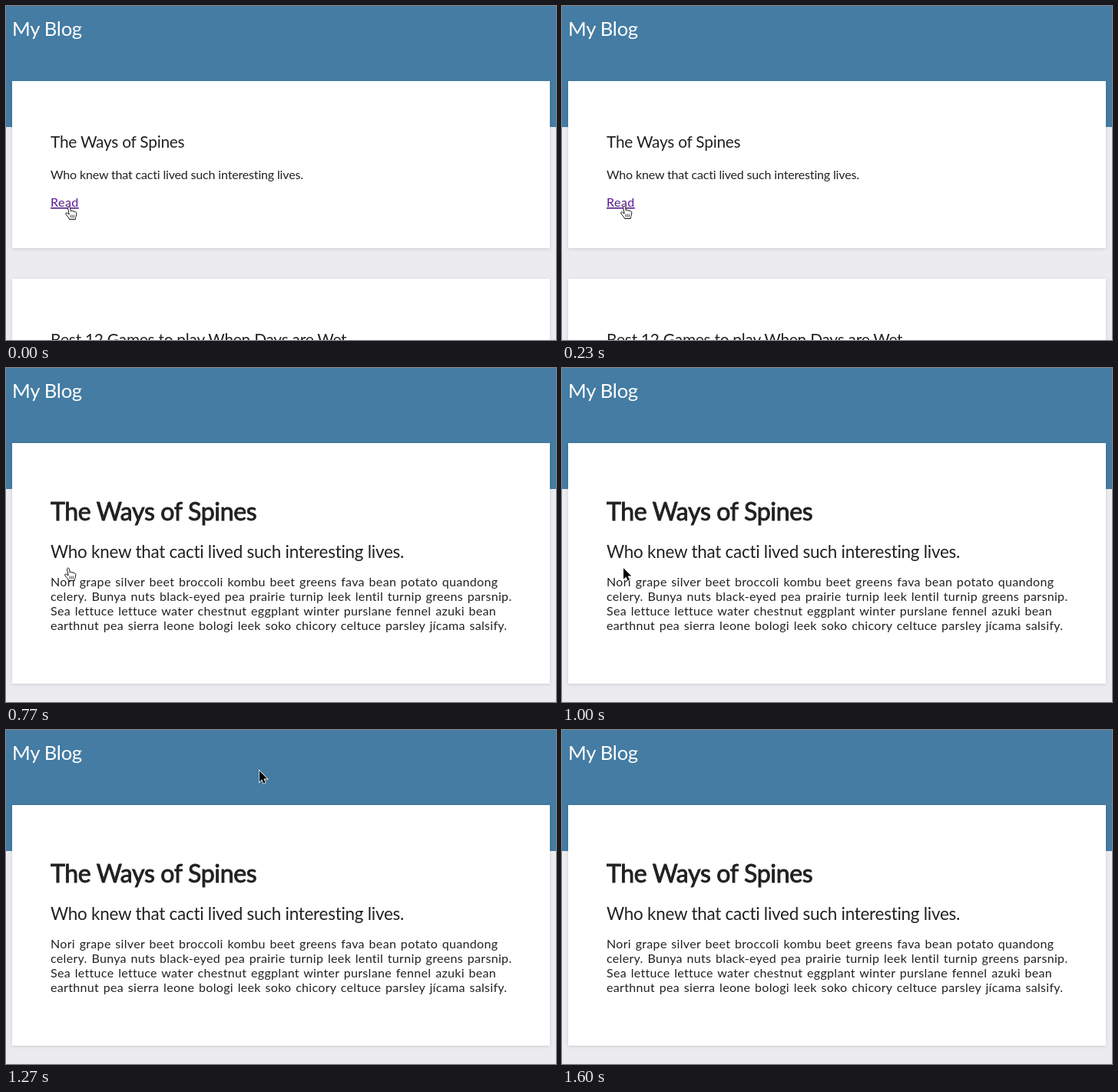
Recreate the animation shown at these times as an HTML page. Size 716 by 436 pixels, loop 2630 ms.

```html
<!DOCTYPE html>
<html lang="en">
<head>
<meta charset="utf-8">
<title>My Blog</title>
<style>
  html, body { margin: 0; width: 100%; height: 100%; overflow: hidden; background: #ecebf0; }
  svg { display: block; width: 716px; height: 436px; }
  text {
    font: 16px Lato, "Open Sans", sans-serif; fill: #212121;
    letter-spacing: -.01em; font-variant-ligatures: none;
  }
  .brand { font-size: 25.6px; fill: #fff; }
  .name { font-size: 20.8px; }
  .lead { font-size: 22.4px; }
  .head { font-size: 32px; stroke: #212121; stroke-width: .9px; }
  .copy { letter-spacing: .02em; word-spacing: .08em; }
  .link { fill: #551a8b; letter-spacing: .03em; text-decoration: underline 1px; }
  .card { fill: #fff; filter: drop-shadow(0 1px 2px rgba(0, 0, 0, .13)); }
  .hand { fill: #fff; stroke: #111; stroke-linejoin: round; stroke-linecap: round; }
  .arrow { fill: #000; stroke: #fff; stroke-width: 1.6px; paint-order: stroke; }
</style>
</head>
<body>
<svg viewBox="0 0 716 436">
  <rect width="716" height="436" fill="#ecebf0"/>
  <rect width="716" height="158" fill="#447ca3"/>
  <text class="brand" x="8" y="39">My Blog</text>

  <g id="list">
    <rect class="card" x="8" y="98" width="700" height="218"/>
    <text class="name" x="58" y="185">The Ways of Spines</text>
    <text x="58" y="226">Who knew that cacti lived such interesting lives.</text>
    <text class="link" x="58" y="262">Read</text>
    <rect class="card" x="8" y="356" width="700" height="218"/>
    <text class="name" x="58" y="443">Best 12 Games to play When Days are Wet</text>
  </g>

  <g id="post">
    <rect class="card" x="8" y="98" width="700" height="314"/>
    <text class="head" x="58" y="199">The Ways of Spines</text>
    <text class="lead" x="58" y="248">Who knew that cacti lived such interesting lives.</text>
    <text class="copy" y="285">
      <tspan x="58">Nori grape silver beet broccoli kombu beet greens fava bean potato quandong</tspan>
      <tspan x="58" dy="19">celery. Bunya nuts black-eyed pea prairie turnip leek lentil turnip greens parsnip.</tspan>
      <tspan x="58" dy="19">Sea lettuce lettuce water chestnut eggplant winter purslane fennel azuki bean</tspan>
      <tspan x="58" dy="19">earthnut pea sierra leone bologi leek soko chicory celtuce parsley jícama salsify.</tspan>
    </text>
  </g>

  <g id="hand" class="hand">
    <path d="M-1.5 1.5C-1.5-.4 1.3-.4 1.5 1.5L2.3 6C3 4.8 4.8 5 5 6.3C6 5.3 7.3 5.8 7.5 7C8.6 6.4 9.8 7 9.8 8.5L9.5 11C9.2 13 8.5 13.6 8.3 16.5H.5C0 14.5-2.3 12.6-4 10C-5.2 8-3 7.2-1.5 9L-.2 9.6Z"/>
    <path d="M2 11v3.2M4.2 11v3.2M6.4 11v3.2" stroke-width=".8"/>
  </g>
  <path id="arrow" class="arrow" d="M0 0V14.5L3.4 11.3L5.6 16.5L7.8 15.5L5.6 10.4H10.2Z"/>
</svg>
<script>
const LOOP = 2630, OPEN = 770, LEAVE = 1000, GONE = 1600;

const get = id => document.getElementById(id);
const list = get("list"), post = get("post"), hand = get("hand"), arrow = get("arrow");
const show = (el, on) => { el.style.display = on ? "" : "none"; };
const clamp = u => Math.max(0, Math.min(1, u));
const curve = (a, c, b, u) => (1 - u) * (1 - u) * a + 2 * u * (1 - u) * c + u * u * b;

// Pointer path: each leg is a curve from a to b bent towards c; it rests at b.
const click = { x: 81, y: 261 }, below = { x: 134.5, y: 260.5 }, header = { x: 582.5, y: 74.5 };
const legs = [
  { from: 30, to: 200, a: { x: 82, y: 262 }, c: click, b: click },
  { from: LEAVE, to: 1170, a: click, c: { x: 0, y: 276 }, b: below },
  { from: 1195, to: 1370, a: below, c: { x: 360, y: -90 }, b: header },
  { from: 1510, to: GONE, a: header, c: { x: 610, y: 53 }, b: { x: 638, y: 32 } }
];

function pointerAt(t) {
  const { from, to, a, c, b } = legs.findLast(leg => t >= leg.from) || legs[0];
  const u = clamp((t - from) / (to - from));
  return [curve(a.x, c.x, b.x, u), curve(a.y, c.y, b.y, u)];
}

function draw(t) {
  const [x, y] = pointerAt(t);
  const pointer = t < LEAVE ? hand : arrow;
  pointer.setAttribute("transform", `translate(${x} ${y})`);
  show(list, t < OPEN);
  show(post, t >= OPEN);
  show(hand, t < LEAVE);
  show(arrow, t >= LEAVE && t < GONE);
}

const start = performance.now();
function tick() {
  draw((performance.now() - start) % LOOP);
  requestAnimationFrame(tick);
}
draw(0);
requestAnimationFrame(tick);
</script>
</body>
</html>
```
